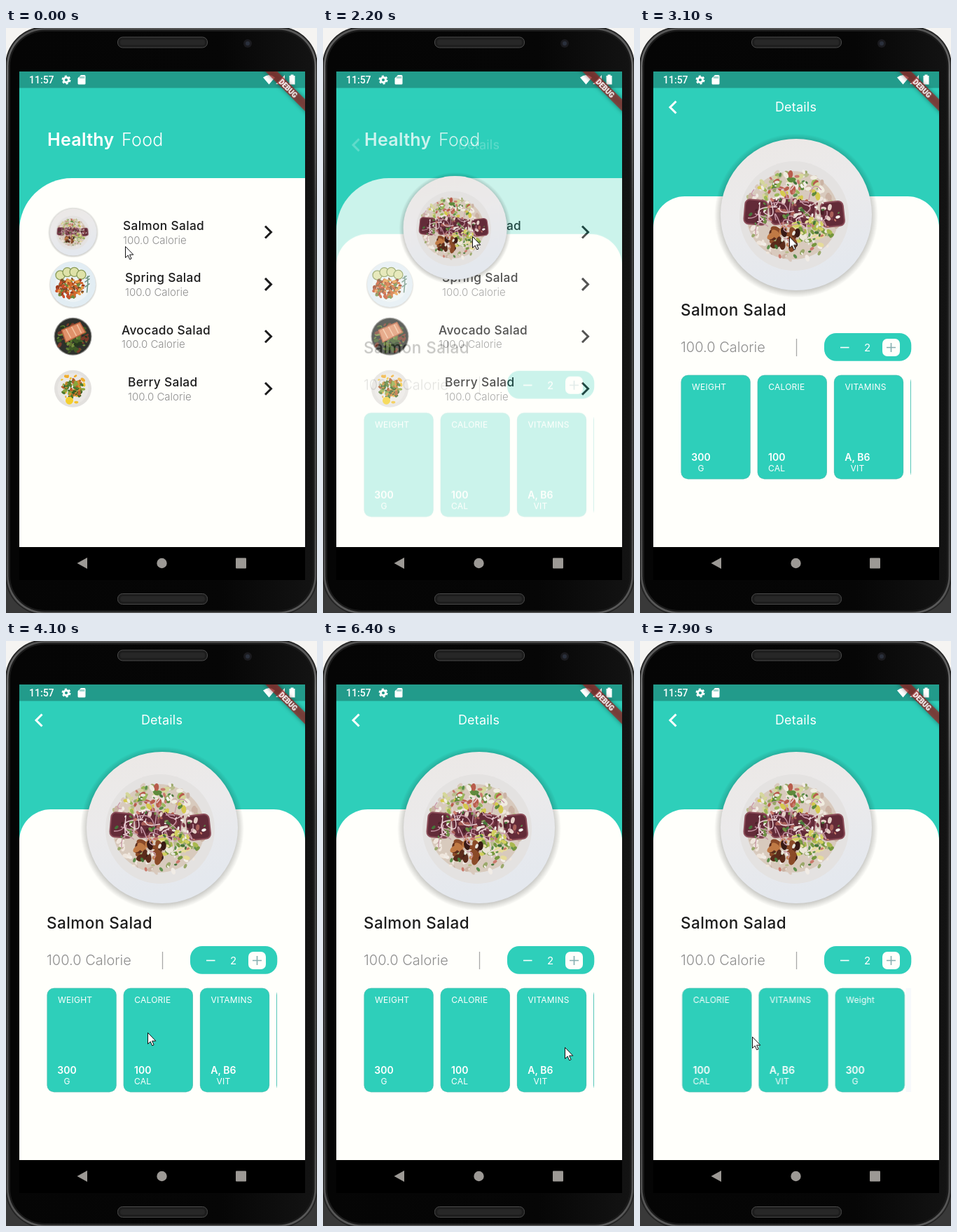
Recreate the animation shown at these times as an HTML page. Size 444 by 834 pixels, loop 8000 ms.

```html
<!DOCTYPE html>
<html lang="en">
<head>
<meta charset="utf-8">
<title>Healthy Food</title>
<style>
  html, body { margin: 0; width: 100%; height: 100%; overflow: hidden; background: #000; }
  svg { display: block; width: 444px; height: 834px; font-family: Inter, sans-serif; }
  .title { font-weight: 500; letter-spacing: .02em; fill: #1c1c1c; }
  .sub { font-weight: 300; fill: #8e8e8e; }
  .roboto { font-family: Roboto, sans-serif; font-weight: 500; }
  .card text { fill: #fff; font-size: 12px; letter-spacing: .02em; }
  .card .value { font-size: 14px; font-weight: 600; letter-spacing: 0; }
  .mid { text-anchor: middle; }

  .detail, .hero, .strip, .cursor { animation: 8s linear infinite; }
  .detail { animation-name: slide, fade; }
  .hero { animation-name: fly; }
  .strip { animation-name: scroll; }
  .cursor { animation-name: point; }

  @keyframes slide {
    0%, 25.875% { transform: translateY(169px); animation-timing-function: cubic-bezier(.4, 0, .2, 1); }
    29.625%, 100% { transform: none; }
  }
  @keyframes fade {
    0%, 25.875% { opacity: 0; animation-timing-function: ease-in; }
    29.625%, 100% { opacity: 1; }
  }
  @keyframes fly {
    0%, 25.875% { transform: translate(96px, 291px) scale(.31); animation-timing-function: cubic-bezier(.5, 0, .8, .6); }
    27.5% { transform: translate(188px, 285px) scale(.68); animation-timing-function: cubic-bezier(.2, .5, .4, 1); }
    29.625%, 100% { transform: translate(223px, 266px) scale(1); }
  }
  @keyframes scroll {
    0%, 60.5%, 76.5%, 80.6%, 87.5%, 94% { transform: none; }
    68.75%, 73%, 83.75%, 98.2%, 100% { transform: translateX(-107.5px); }
  }
  @keyframes point {
    0% { transform: translate(170px, 311px); animation-timing-function: ease-in-out; }
    12%, 38.5% { transform: translate(213px, 297px); animation-timing-function: ease-in-out; }
    49%, 60.5% { transform: translate(202px, 558px); }
    68.75%, 73% { transform: translate(95px, 562px); }
    76.5%, 80.6% { transform: translate(345px, 579px); }
    83.75% { transform: translate(230px, 578px); }
    87.5% { transform: translate(430px, 582px); }
    90%, 94% { transform: translate(326px, 580px); }
    98.5%, 100% { transform: translate(160px, 564px); }
  }
</style>
</head>
<body>
<svg id="stage" viewBox="0 0 444 834"></svg>
<script>
const TEAL = '#2ecfba', PAPER = '#fffffb';

const rect = (x, y, w, h, r, fill, extra = '') =>
  `<rect x="${x}" y="${y}" width="${w}" height="${h}" rx="${r}" fill="${fill}" ${extra}/>`;
const circle = (x, y, r, fill, extra = '') =>
  `<circle cx="${x}" cy="${y}" r="${r}" fill="${fill}" ${extra}/>`;
const line = (d, color, width) =>
  `<path d="${d}" fill="none" stroke="${color}" stroke-width="${width}"/>`;
const text = (x, y, content, cls = '', extra = '') =>
  `<text x="${x}" y="${y}" class="${cls}" ${extra}>${content}</text>`;
const at = (x, y, content) => `<g transform="translate(${x} ${y})">${content}</g>`;
const repeat = (n, make) => Array.from({ length: n }, (_, i) => make(i)).join('');

function randomizer(seed) {
  return () => (seed = (seed * 16807) % 2147483647) / 2147483647;
}

// Small pieces of food strewn over an ellipse.
function bits(seed, count, x, y, rx, ry, size, colors) {
  const rnd = randomizer(seed * 7919);
  return repeat(count, i => {
    const a = rnd() * 2 * Math.PI, d = Math.sqrt(rnd());
    const s = size * (.5 + rnd() * .7);
    const px = (x + Math.cos(a) * d * rx).toFixed(1), py = (y + Math.sin(a) * d * ry).toFixed(1);
    return `<ellipse rx="${s.toFixed(1)}" ry="${(s * .6).toFixed(1)}" fill="${colors[i % colors.length]}"
      transform="translate(${px} ${py}) rotate(${Math.round(rnd() * 180)})"/>`;
  });
}

function strands(seed, count) {
  const rnd = randomizer(seed * 7919), near = s => Math.round((rnd() - .5) * s);
  return repeat(count, () =>
    line(`M${near(105) - 8} ${near(80)}q${near(50)} ${near(50)} ${near(50)} ${near(50)}`,
      rnd() < .6 ? '#c99aa8' : '#ead2d6', 1.4));
}

function salmonDish() {
  const tuna = [[-74, -21, 5], [-37, -22, -8], [-6, -19, 8], [36, -18, -6]];
  return circle(0, 1.5, 117, 'url(#shade)') + circle(0, 0, 108, 'url(#plate)') +
    circle(-3, 2, 78, '#e4e2e1') +
    '<ellipse cx="-5" cy="1" rx="66" ry="63" fill="#d8cabd"/>' +
    bits(31, 170, -5, 1, 69, 65, 4.5, ['#f1ece6', '#d9c9bd', '#b9bd8d', '#efe6dd', '#cbb3a4', '#9aa86a']) +
    bits(5, 60, -8, -36, 46, 24, 5.5, ['#5f8a3c', '#9ab858', '#d5d79a', '#d4c94e', '#b85c4c', '#f0ece0']) +
    tuna.map(([x, y, turn]) => rect(x, y, 32, 35, 7, '#632b38', `stroke="#8b4c58" stroke-width="2" transform="rotate(${turn} ${x + 15} 0)"`)).join('') +
    bits(77, 45, -4, -2, 66, 20, 4, ['#4a2028', '#7d3b47', '#6f8f45', '#e5d0c8', '#a9605a']) +
    bits(12, 34, 22, 25, 30, 20, 6, ['#d2cf60', '#a9b84e', '#e6dc9a', '#76973e', '#ece6d8']) +
    bits(9, 26, -14, 33, 24, 14, 7, ['#5a2b1b', '#8a4a28', '#381a15', '#c07a45']) +
    strands(21, 34) +
    bits(44, 70, -5, 1, 66, 62, 3, ['#5e8f4c', '#f7f4ef', '#46753a', '#e8e6dc', '#c97a6c']);
}

function springDish() {
  return circle(0, 1, 34.5, 'url(#shade)') + circle(0, 0, 32.5, '#e2edf3') + circle(0, 0, 25, '#edf3f6') +
    repeat(4, i => circle(-18 + i * 10, -13 - Math.sin(i) * 5, 6.5, '#dfe2a8', 'stroke="#8a9b58" stroke-width="1.3"')) +
    bits(8, 110, -4, 5, 20, 14, 3.2, ['#d2692c', '#9c3b1f', '#e79a45', '#7a4a26', '#6f8a3c', '#c94f2a']) +
    line('M20 12q2-12 1-24M17 4l7-5M17-3l7-5M18-8l6-4', '#6f9482', 1.6);
}

function avocadoDish() {
  return circle(0, 0, 27, '#8f8f8b') + circle(0, 0, 25.8, '#2e302c') +
    bits(15, 80, 0, 2, 22, 21, 3.6, ['#3f5a25', '#5c7a30', '#26381c', '#76913f', '#7b3a2a']) +
    '<path d="M-16-9L10-20 18-6-10 8Z" fill="#e0916a" stroke="#b85f3c" stroke-width="1.5"/>' +
    line('M-10-11l7 13M-2-14l7 13M6-17l6 12', '#f3c3a0', 1.5);
}

function berryDish() {
  return circle(0, 0, 26.5, '#e3e1de') + circle(0, 0, 22, '#eae8e5') +
    bits(19, 14, 0, 0, 23, 21, 3.3, ['#f2c230', '#f0ad2c']) +
    bits(23, 80, 0, 0, 16, 13, 3.2, ['#4f7a2c', '#d98a2b', '#355c22', '#b5602a', '#8aa63c']) +
    circle(-5, 17, 5.5, '#f4cf2c');
}

const dishes = [['Salmon', 167], ['Spring', 170, springDish], ['Avocado', 165, avocadoDish], ['Berry', 174, berryDish]];

const listPage = rect(19, 62, 408, 678, 0, TEAL) +
  `<path d="M19 740V289a75 75 0 0 1 75-75H427V740Z" fill="${PAPER}"/>` +
  text(59, 168, 'Healthy', '', 'font-size="25" font-weight="600" letter-spacing=".3" fill="#fff"') +
  text(165, 168, 'Food', '', 'font-size="25" font-weight="300" letter-spacing=".3" fill="#fff"') +
  dishes.map(([name, x, draw], i) => {
    const y = 291 + i * 74.4;
    return (draw ? at(95.5, y, draw()) : '') +
      text(x, y - 3, name + ' Salad', 'title', 'font-size="17.300"') +
      text(x, y + 16.5, '100.0 Calorie', 'sub', 'font-size="15"') +
      line(`M370 ${y - 8.5}l8.5 8.5-8.5 8.5`, '#1c1c1c', 3);
  }).join('');

const cards = [['WEIGHT', 300, 'G', 28.5], ['CALORIE', 100, 'CAL', 27.5], ['VITAMINS', 'A, B6', 'VIT', 33.5], ['Weight', 300, 'G', 28.5]];

const strip = cards.map(([label, value, unit, center], i) =>
  `<g class="card" transform="translate(${58.5 + i * 109.2} 0)">` +
  rect(0, 494.7, 99.2, 148.6, 10, TEAL) +
  rect(.4, 495.1, 98.4, 147.8, 9.6, 'none', 'stroke="#9e9e9e" stroke-opacity=".3" stroke-width=".75"') +
  text(15.5, 516, label) + text(center, 617, value, 'value mid') + text(center, 632, unit, 'mid') + '</g>').join('') +
  rect(487, 495, 9, 148, 0, '#f7f9fb');

const detailPage = rect(19, 62, 408, 678, 0, TEAL) +
  `<path d="M19 740V285a45 45 0 0 1 45-45H382a45 45 0 0 1 45 45V740Z" fill="${PAPER}"/>` +
  line('M51.5 104.500l-8.500 8.500 8.500 8.500', '#fff', 3) +
  text(222.5, 119, 'Details', 'mid', 'font-size="18" letter-spacing=".2" fill="#fff"') +
  text(58, 410, 'Salmon Salad', 'title', 'font-size="22.500"') +
  text(58, 462, '100.0 Calorie', 'sub', 'font-size="20"') +
  line('M223.500 443V468', '#a8a8a8', 1.3) +
  rect(263, 435, 124.3, 39.7, 17, TEAL) + line('M286 455.500h12.500', '#fff', 1.6) +
  text(324.5, 461, 2, 'mid', 'font-size="15" fill="#fff"') +
  rect(346, 443, 25, 25, 7, PAPER) + line('M352 455.500h13M358.500 449v13', '#86aeb0', 1.6) +
  `<g clip-path="url(#strip)"><g class="strip">${strip}</g></g>`;

const banner = `<g transform="translate(427 62) rotate(45)">` +
  rect(-60, 28, 120, 12, 0, '#a01c1c', 'fill-opacity=".68" style="filter:drop-shadow(0 0 3px #0009)"') +
  text(0, 37.7, 'DEBUG', 'roboto mid', 'font-size="10" style="font-weight:900" fill="#fff"') + '</g>';

const statusBar = rect(19, 62, 408, 23.5, 0, '#000', 'fill-opacity=".25"') +
  text(33, 79, '11:57', 'roboto', 'font-size="14" fill="#fff"') +
  circle(86, 74, 3.5, 'none', 'stroke="#fff" stroke-width="2.800"') +
  circle(86, 74, 5.5, 'none', 'stroke="#fff" stroke-width="2" stroke-dasharray="3 2.76"') +
  '<path fill="#fff" d="M107 67h5q1.500 0 1.500 1.500v10.500q0 1.500-1.500 1.500h-8q-1.500 0-1.500-1.500V71.500ZM367 70.500q8.500-7 17 0L375.500 80.500ZM398 67V80H385ZM404.500 68h2v-1.500h4V68h2V80.500h-8Z"/>' +
  line('M106 69v3M108.500 69v3M111 69v3', '#229b8b', 1);

const speaker = y => rect(159.5, y, 128, 15, 7, '#1d1d1d', 'stroke="#4a4a4a"') + rect(163, y + 3.5, 121, 8, 4, '#272727');

const phone = rect(0, 0, 444, 417, 0, '#f5f4f2') + rect(0, 417, 444, 417, 0, '#393939') +
  rect(-1, -2, 446, 839, 56, '#242424') + rect(1, 0, 442, 835, 54, 'url(#rim)') +
  rect(3.5, 2.5, 437, 830, 52, '#1a1a1a') + rect(6, 5, 432, 825, 49, 'url(#glass)') +
  speaker(13) + speaker(806.5) + circle(345, 22, 6, '#1b1b1f') + circle(345, 22, 3, '#2a303c');

const navBar = rect(19, 740, 408, 47, 0, '#000') +
  '<path d="M116 755v16l-14.500-8Z" fill="#9c9995"/>' +
  circle(222.5, 763, 7.2, '#9c9995') + rect(328, 755.5, 15, 15, 1, '#9c9995');

const defs = `<defs>
  <clipPath id="screen">${rect(19, 62, 408, 678, 0, '#000')}</clipPath>
  <clipPath id="strip">${rect(58, 494, 329, 150, 0, '#000')}</clipPath>
  <linearGradient id="rim" x2="0" y2="1"><stop stop-color="#555"/><stop offset=".08" stop-color="#707070"/>
    <stop offset=".3" stop-color="#3f3f3f"/><stop offset=".85" stop-color="#484848"/><stop offset="1" stop-color="#5a5a5a"/></linearGradient>
  <linearGradient id="glass"><stop stop-color="#050505"/><stop offset=".7" stop-color="#060606"/><stop offset="1" stop-color="#131313"/></linearGradient>
  <linearGradient id="plate" x2=".3" y2="1"><stop stop-color="#ece8e5"/><stop offset=".5" stop-color="#ebeaeb"/>
    <stop offset="1" stop-color="#e4e8ee"/></linearGradient>
  <radialGradient id="shade"><stop offset=".88" stop-opacity=".28"/><stop offset="1" stop-opacity="0"/></radialGradient>
</defs>`;

document.getElementById('stage').innerHTML = defs + phone +
  `<g clip-path="url(#screen)">${listPage}<g class="detail">${detailPage}</g>
    <g class="hero">${salmonDish()}</g>${statusBar}${banner}</g>` + navBar +
  '<g class="cursor"><path d="M.5.5V16.500l3.700-3.400 2.500 5.700 2.400-1-2.500-5.600h5.200Z" fill="#fff" stroke="#111"/></g>';
</script>
</body>
</html>
```
